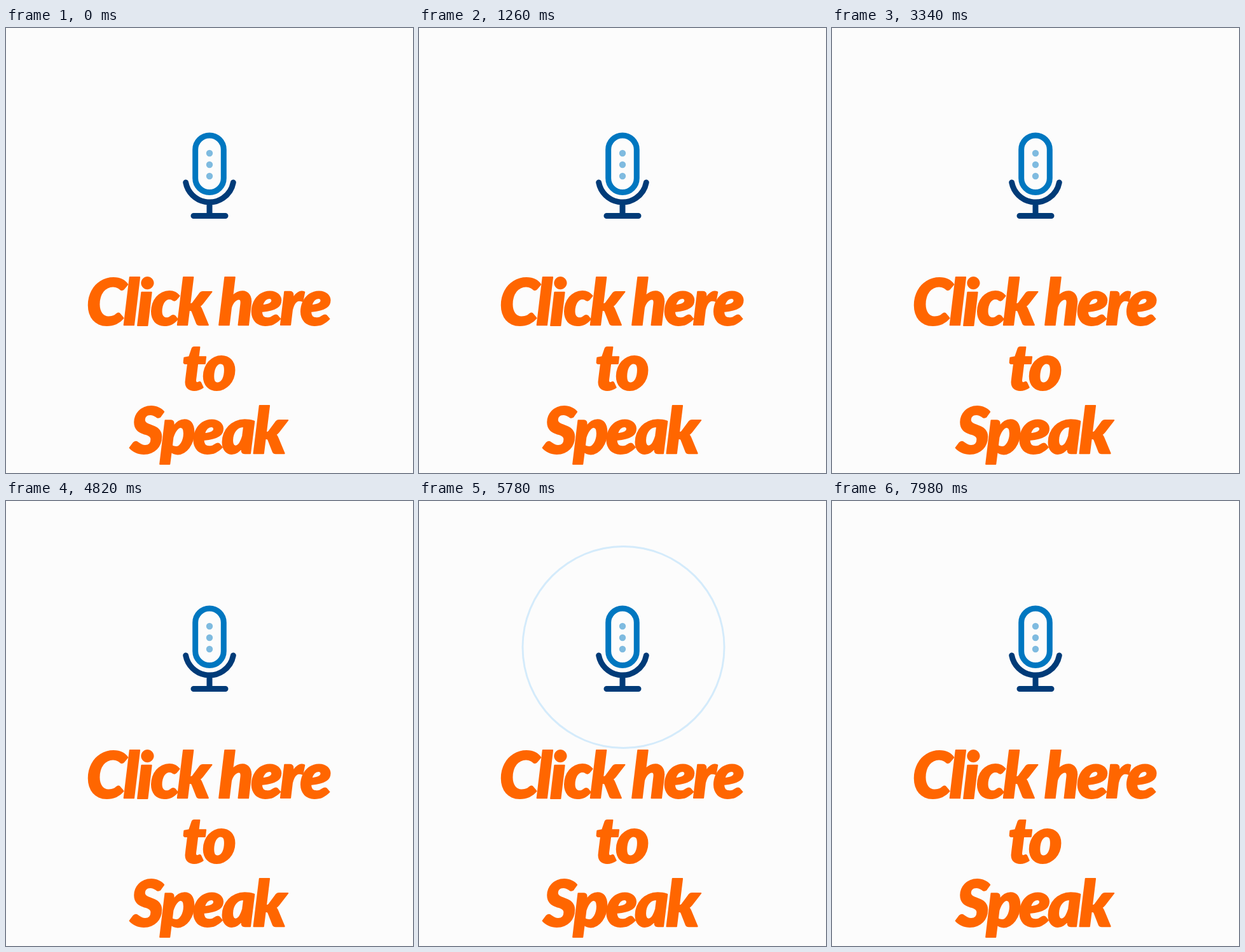
An HTML page with a canvas that plays this animation: 640 px wide and 700 px high, repeating every 8 s.

```html
<!DOCTYPE html>
<html lang="en">
<head>
<meta charset="utf-8">
<title>Click here to Speak</title>
<style>
  html, body { margin: 0; width: 100%; height: 100%; overflow: hidden; background: #fcfcfc; }
  canvas { display: block; }
</style>
</head>
<body>
<canvas id="stage" width="640" height="700" aria-label="Click here to Speak"></canvas>
<script>
const ctx = document.getElementById('stage').getContext('2d');
const LOOP = 8000, STEP = 20;
const BLUE = '#0077c0', NAVY = '#003b78', DOT = '#7fbbe0', RING = '#d4ebfb', ORANGE = '#ff6600';

// Each pulse: start and length in ms
const pulses = [
  [540, 240], [820, 240], [1100, 160],
  [2940, 240], [3220, 120],
  [5340, 240], [5640, 160],
  [7740, 240]
];

const lines = [['Click here', 320, 467], ['to', 319.5, 569], ['Speak', 319, 669]];
const LINE_WIDTH = 380;

const easeOut = (p, power) => 1 - (1 - p) ** power;

function setFont(size) {
  ctx.font = `italic 900 ${size}px Lato, "Open Sans", sans-serif`;
  ctx.letterSpacing = `${-0.04 * size}px`;
}

function inkBounds(text) {
  const m = ctx.measureText(text);
  return { left: -m.actualBoundingBoxLeft, right: m.actualBoundingBoxRight };
}

ctx.textAlign = 'left';
setFont(100);
const reference = inkBounds(lines[0][0]);
const fontSize = 100 * LINE_WIDTH / (reference.right - reference.left);

function drawCaption() {
  setFont(fontSize);
  ctx.fillStyle = ctx.strokeStyle = ORANGE;
  ctx.lineWidth = 2;
  ctx.lineJoin = 'round';
  for (const [text, center, baseline] of lines) {
    const { left, right } = inkBounds(text);
    const x = center - (left + right) / 2;
    ctx.fillText(text, x, baseline);
    ctx.strokeText(text, x, baseline);
  }
}

// A disc grows quickly while a slower hole catches up with its edge
function drawPulse(p) {
  ctx.fillStyle = RING;
  ctx.beginPath();
  ctx.arc(321.5, 230, 160.3 * easeOut(p, 3), 0, 2 * Math.PI);
  ctx.arc(321.5, 230, 160.3 * easeOut(p, 1.88), 0, 2 * Math.PI);
  ctx.fill('evenodd');
}

function stroke(color, trace) {
  ctx.strokeStyle = color;
  ctx.beginPath();
  trace();
  ctx.stroke();
}

function drawMic() {
  ctx.lineWidth = 9;
  ctx.lineCap = 'round';
  stroke(NAVY, () => {
    const tilt = Math.asin(7 / 38);
    ctx.arc(320, 236, 38, tilt, Math.PI - tilt);
    ctx.moveTo(320, 275);
    ctx.lineTo(320, 295.5);
    ctx.moveTo(295, 295.5);
    ctx.lineTo(345, 295.5);
  });
  stroke(BLUE, () => ctx.roundRect(297.7, 169, 44.6, 89.5, 22.3));
  ctx.fillStyle = DOT;
  for (const y of [197, 215, 233]) {
    ctx.beginPath();
    ctx.arc(320, y, 5.2, 0, 2 * Math.PI);
    ctx.fill();
  }
}

function draw(time) {
  ctx.fillStyle = '#fcfcfc';
  ctx.fillRect(0, 0, 640, 700);
  for (const [start, length] of pulses) {
    const p = (time - start) / length;
    if (p >= 0 && p < 1) drawPulse(p);
  }
  drawMic();
  drawCaption();
}

const begin = performance.now();
function tick() {
  const time = (performance.now() - begin) % LOOP;
  draw(Math.floor(time / STEP) * STEP);
  requestAnimationFrame(tick);
}
tick();
</script>
</body>
</html>
```
